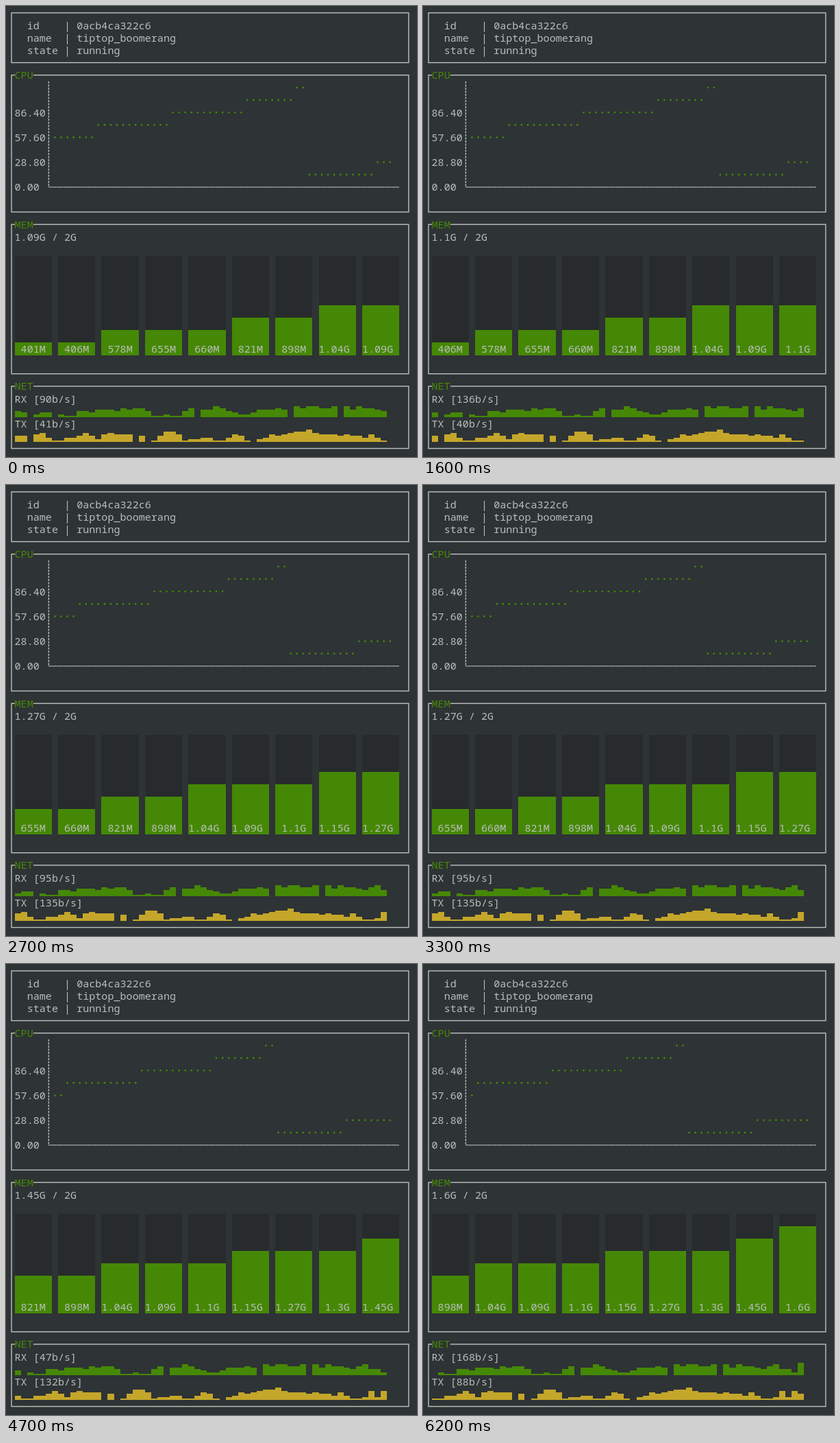
An HTML page with a canvas for the animation above (6.3 s loop, 600 px wide and 657 px high).

```html
<!DOCTYPE html>
<html lang="en">
<head>
<meta charset="utf-8">
<title>Container monitor</title>
<style>
  html, body { margin: 0; width: 100%; height: 100%; overflow: hidden; background: #2e3335; }
  canvas { display: block; width: 600px; height: 657px; }
</style>
</head>
<body>
<canvas id="stage" width="600" height="657"></canvas>
<script>
const ctx = document.getElementById('stage').getContext('2d');
const LOOP = 6300;
const CELL_W = 9.06, CELL_H = 18.13;
const BG = '#2e3335', FG = '#b9beb9', LINE = '#bcc2bf';
const GREEN = '#458805', YELLOW = '#c4a62a', EMPTY = '#272b2d';

// Terminal grid: left edge / centre of a column, top edge / centre of a row.
const colLeft = col => 3.5 + col * CELL_W;
const colMid = col => colLeft(col) + CELL_W / 2;
const rowMid = row => 10 + row * CELL_H;
const rowTop = row => rowMid(row) - CELL_H / 2;

// CPU samples as runs of [row, count].
const cpu = [[10, 7], [9, 12], [8, 12], [7, 8], [6, 2], [13, 11], [12, 9]]
  .flatMap(([row, count]) => Array(count).fill(row));
const CPU_VISIBLE = 55;

const mem = ['401M', '406M', '578M', '655M', '660M', '821M', '898M', '1.04G',
  '1.09G', '1.1G', '1.15G', '1.27G', '1.3G', '1.45G', '1.6G'];
const MEM_VISIBLE = 9;

const NET_VISIBLE = 60, PEAK_RATE = 168;
const rx = {
  label: 'RX', row: 31, color: GREEN, seed: 5,
  rates: [90, 136, 167, 95, 96, 47, 168],
  trend: [[0, 4], [8, 1], [11, 4], [16, 5], [20, 6], [22, 1], [26, 1], [28, 6],
    [33, 6], [36, 2], [41, 6], [58, 6]],
  idle: [2, 6, 29, 44, 52]
};
const tx = {
  label: 'TX', row: 33, color: YELLOW, seed: 11,
  rates: [41, 40, 46, 135, 59, 132, 88],
  trend: [[0, 4], [4, 5], [6, 1], [11, 5], [13, 2], [15, 6], [22, 2], [25, 8],
    [27, 1], [30, 4], [33, 1], [35, 6], [37, 1], [46, 8], [49, 5], [58, 4]],
  idle: [2, 19, 21, 38]
};

function seededRandom(seed) {
  return () => (seed = seed * 16807 % 2147483647) / 2147483647;
}

function interpolate(points, x) {
  const next = Math.max(1, points.findIndex(([px]) => px >= x));
  const [x0, y0] = points[next - 1], [x1, y1] = points[next];
  return y0 + (y1 - y0) * (x - x0) / (x1 - x0);
}

// Past traffic wavers around its trend; the newest bars follow the printed rates.
function trafficLevels({ seed, rates, trend, idle }) {
  const random = seededRandom(seed * 7919);
  const past = Array.from({ length: NET_VISIBLE - 1 }, (_, i) => {
    const level = Math.round(interpolate(trend, i) + (random() - 0.5) * 2);
    return idle.includes(i) ? 0 : Math.min(8, Math.max(1, level));
  });
  return past.concat(rates.map(rate => Math.floor(8 * rate / PEAK_RATE)));
}

for (const channel of [rx, tx]) channel.levels = trafficLevels(channel);

function text(str, col, row, color = FG) {
  ctx.fillStyle = color;
  ctx.fillText(str, colLeft(col), rowMid(row) + 5.5);
}

function rect(x, y, w, h, color) {
  const x0 = Math.round(x), y0 = Math.round(y);
  ctx.fillStyle = color;
  ctx.fillRect(x0, y0, Math.round(x + w) - x0, Math.round(y + h) - y0);
}

function line(x1, y1, x2, y2, dash) {
  ctx.setLineDash(dash);
  ctx.beginPath();
  ctx.moveTo(x1, y1);
  ctx.lineTo(x2, y2);
  ctx.stroke();
  ctx.setLineDash([]);
}

function panel(firstRow, lastRow, title) {
  const x = colMid(0), y = rowMid(firstRow);
  ctx.strokeStyle = LINE;
  ctx.lineWidth = 1.4;
  ctx.strokeRect(x, y, colMid(64) - x, rowMid(lastRow) - y);
  if (title) {
    rect(colLeft(1), y - 2, title.length * CELL_W, 4, BG);
    text(title, 1, firstRow, GREEN);
  }
}

function drawInfo() {
  panel(0, 4);
  text('id    | 0acb4ca322c6', 3, 1);
  text('name  | tiptop_boomerang', 3, 2);
  text('state | running', 3, 3);
}

function drawCpu(step) {
  panel(5, 16, 'CPU');
  ['86.40', '57.60', '28.80', '0.00'].forEach((label, i) => text(label, 1, 8 + 2 * i));

  const axisX = colMid(6), axisY = rowMid(14);
  ctx.strokeStyle = LINE;
  line(axisX, rowTop(6), axisX, axisY, [CELL_H / 4 - 1.4, 1.4]);
  line(axisX, axisY, colLeft(63), axisY, [CELL_W / 4 - 0.7, 0.7]);

  ctx.fillStyle = GREEN;
  cpu.slice(step, step + CPU_VISIBLE).forEach((row, i) => {
    ctx.beginPath();
    ctx.arc(colMid(7 + i), rowMid(row), 1.4, 0, Math.PI * 2);
    ctx.fill();
  });
}

function filledRows(size) {
  const megabytes = parseFloat(size) * (size.endsWith('G') ? 1000 : 1);
  return Math.floor(megabytes / 1820 * 8);
}

function drawMem(step) {
  panel(17, 29, 'MEM');
  const sizes = mem.slice(step, step + MEM_VISIBLE);
  text(sizes[MEM_VISIBLE - 1] + ' / 2G', 1, 18);
  sizes.forEach((size, i) => {
    const col = 1 + i * 7, rows = filledRows(size);
    rect(colLeft(col), rowTop(20), 6 * CELL_W, 8 * CELL_H, EMPTY);
    rect(colLeft(col), rowTop(28 - rows), 6 * CELL_W, rows * CELL_H, GREEN);
    text(size, col + Math.floor((6 - size.length) / 2), 27);
  });
}

function drawTraffic({ label, row, color, rates, levels }, step) {
  text(`${label} [${rates[step]}b/s]`, 1, row);
  levels.slice(step, step + NET_VISIBLE).forEach((level, i) => {
    const height = level * CELL_H / 8;
    rect(colLeft(1 + i), rowTop(row + 2) - height, CELL_W, height, color);
  });
}

function drawNet(step) {
  panel(30, 35, 'NET');
  drawTraffic(rx, step);
  drawTraffic(tx, step);
}

function draw(time) {
  // One new sample per second, the first one at 700 ms.
  const step = Math.floor((time % LOOP + 300) / 1000);
  rect(0, 0, 600, 657, BG);
  ctx.font = '15.1px "Noto Sans Mono", "DejaVu Sans Mono", monospace';
  drawInfo();
  drawCpu(step);
  drawMem(step);
  drawNet(step);
}

const start = performance.now();
function tick() {
  draw(performance.now() - start);
  requestAnimationFrame(tick);
}
tick();
</script>
</body>
</html>
```
